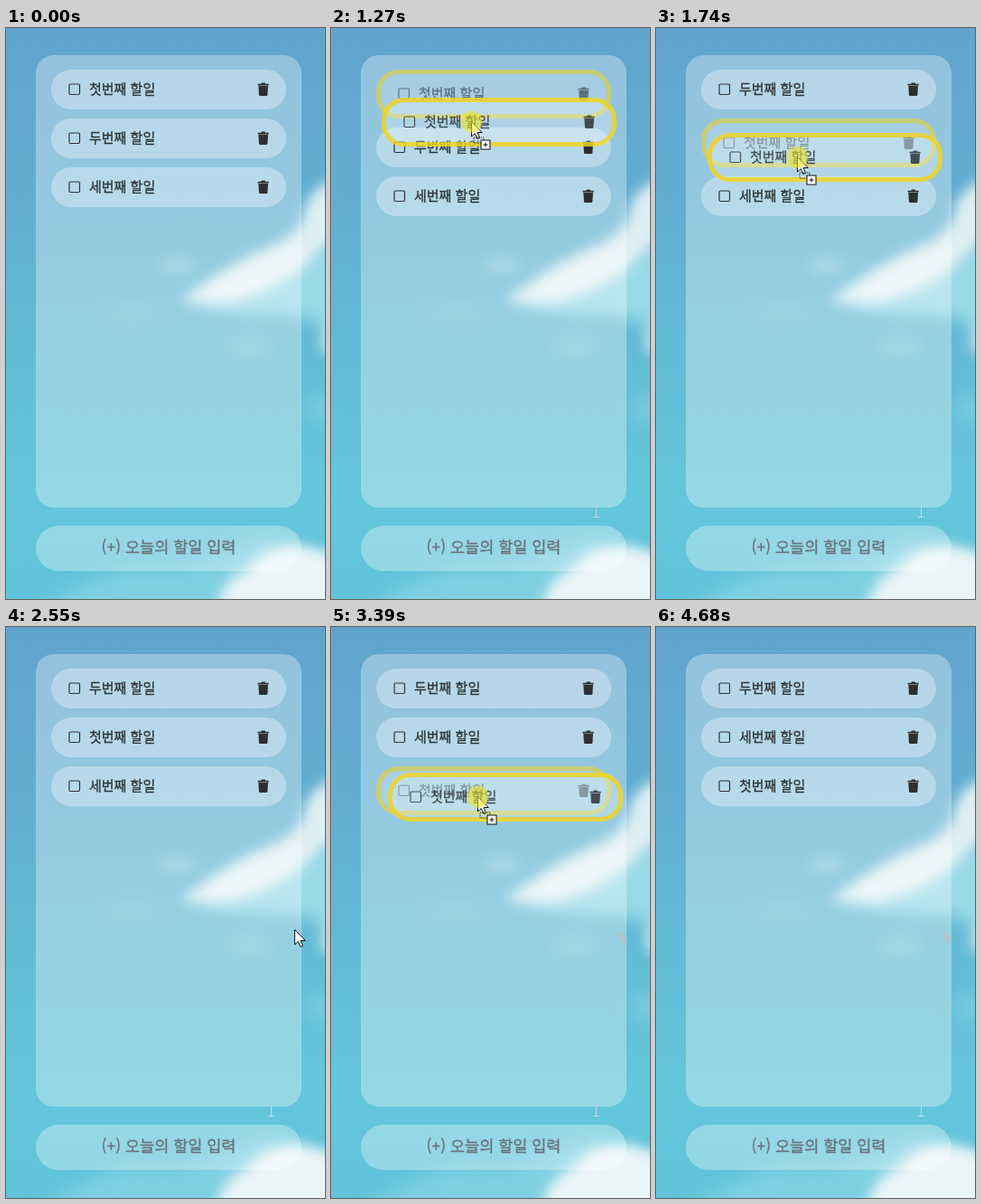
An HTML page for the animation above (5460 ms loop, 353x631 px).

```html
<!DOCTYPE html>
<html lang="ko">
<head>
<meta charset="utf-8">
<title>할일 목록</title>
<style>
  html, body { margin: 0; width: 100%; height: 100%; overflow: hidden; background: #62bcd6; }
  svg { display: block; width: 353px; height: 631px; }
  text { font-family: "Noto Sans CJK KR", "Noto Sans CJK", sans-serif; font-weight: 500; stroke-width: .3; }
</style>
</head>
<body>
<svg viewBox="0 0 353 631">
  <defs>
    <linearGradient id="sky" x2="0" y2="1">
      <stop offset="0" stop-color="#61a3cd"/>
      <stop offset=".3" stop-color="#62aed1"/>
      <stop offset=".6" stop-color="#63bdd6"/>
      <stop offset=".82" stop-color="#64c6db"/>
      <stop offset="1" stop-color="#60c3d9"/>
    </linearGradient>
    <filter id="soft" x="-50%" y="-50%" width="200%" height="200%"><feGaussianBlur stdDeviation="7"/></filter>
    <filter id="haze" x="-50%" y="-50%" width="200%" height="200%"><feGaussianBlur stdDeviation="10"/></filter>
    <g id="trash" fill="#2f2f2f">
      <path d="M4.2 1.2L5 0H8.5L9.3 1.2H12.7V3H.6V1.2Z"/>
      <path d="M1.3 3.6H12L11.4 13.2Q11.3 14.6 9.9 14.6H3.4Q2 14.6 1.9 13.2Z"/>
    </g>
    <path id="pointer" d="M0 0V16.5L3.8 13L6.4 19L9 17.9L6.5 12H11.7Z"/>
  </defs>

  <rect width="353" height="631" fill="url(#sky)"/>
  <g filter="url(#haze)" fill="#a4e1ec">
    <path d="M380 230L250 275L195 304L250 314L330 320L380 345Z" opacity=".85"/>
    <ellipse cx="140" cy="316" rx="38" ry="9" opacity=".28"/>
    <ellipse cx="270" cy="351" rx="26" ry="10" opacity=".4"/>
    <ellipse cx="352" cy="420" rx="20" ry="14" opacity=".4"/>
    <path d="M30 650Q110 585 190 600L290 560L353 590V650Z" opacity=".45"/>
  </g>
  <g filter="url(#soft)" fill="#f0f7f8">
    <path d="M380 160Q336 174 330 200Q328 224 300 238Q255 256 218 284L192 302L245 304Q295 292 330 264Q350 240 380 226Z" opacity=".88"/>
    <ellipse cx="189" cy="263" rx="20" ry="8" opacity=".28"/>
    <path d="M380 304Q342 330 348 358L380 366Z" opacity=".6"/>
    <path d="M232 660Q232 612 266 598Q286 572 320 572Q350 572 380 592V660Z" opacity=".95"/>
  </g>

  <g fill="#fff" fill-opacity=".32">
    <rect x="33" y="30" width="294" height="500" rx="20"/>
    <rect x="33" y="550" width="294" height="50" rx="25"/>
  </g>
  <text x="180" y="579.5" font-size="17.5" text-anchor="middle" fill="#687378" stroke="#687378">(+) 오늘의 할일 입력</text>

  <path id="barTrail" d="M293.5 529V541M290 540.5H297" fill="none" stroke="#d3e2e6" opacity=".8"/>
  <use id="pointerTrail" href="#pointer" x="317.5" y="333.5" fill="#b0c4cc" opacity=".85"/>
  <g id="list"></g>

  <g id="cursor">
    <path id="bar" d="M-3 -8.5H3M.5 -8.5V8.5M-3 8.5H3" fill="none" stroke="#e8eef0"/>
    <path id="move" d="M0 -12L5 -7H2V-2H7V-5L12 0L7 5V2H2V7H5L0 12L-5 7H-2V2H-7V5L-12 0L-7 -5V-2H-2V-7H-5Z" fill="#fff" stroke="#222"/>
    <use id="arrow" href="#pointer" fill="#fff" stroke="#111"/>
    <g id="copy" stroke="#111">
      <rect x="2.5" y="17.5" width="11" height="6" fill="none" stroke-dasharray="1 1"/>
      <rect x="10.5" y="20.5" width="10" height="10" fill="#fff"/>
      <path d="M13 25.5H18M15.5 23V28"/>
    </g>
    <circle id="press" r="12" fill="#f0e51e" opacity=".58"/>
  </g>
</svg>
<script>
const LOOP = 5460;
const STEP = 67;              // cursor positions are sampled at about 15 per second
const ROW = 54, TOP = 46, LEFT = 50, INSET = 5;
const GRAB = { x: 99, y: 26 };

const $ = id => document.getElementById(id);
const show = (el, on) => el.setAttribute('display', on ? 'inline' : 'none');
const place = (el, x, y) => el.setAttribute('transform', `translate(${x} ${y})`);
const within = (v, a, b) => v >= a && v < b;

// Each move glides from the previous resting point; bow bends the path sideways.
const home = { x: 380, y: 594 };
const moves = [
  { start: 200, end: 730, x: 149, y: 72, bow: -110 },
  { start: 1070, end: 1410, x: 157, y: 114 },
  { start: 1480, end: 1740, x: 156, y: 142 },
  { start: 2130, end: 2330, x: 345, y: 378 },
  { start: 2550, end: 3040, x: 148, y: 127, bow: 12 },
  { start: 3110, end: 3580, x: 163, y: 203, bow: -3, ease: 0.7 },
  { start: 3980, end: 4110, x: 288, y: 382 },
  { start: 4460, end: 4680, x: 317, y: 660 }
];

const drags = [
  { press: 870, lift: 1070, drop: 2070 },
  { press: 3110, lift: 3170, drop: 3910 }
];

function cursorAt(t) {
  const i = moves.findLastIndex(m => m.start <= t);
  if (i < 0) return home;
  const from = moves[i - 1] || home;
  const { start, end, x, y, bow = 0, ease = 0.3 } = moves[i];
  const last = Math.round((end - start) / STEP);
  const step = Math.min(last, Math.floor((t - start) / (end - start) * last + 0.15));
  const p = (step + 1) / (last + 1);
  const k = p * (1 + ease * (1 - p));
  const dx = x - from.x, dy = y - from.y;
  const bend = 4 * k * (1 - k) * bow / Math.hypot(dx, dy);
  return {
    x: Math.round(from.x + dx * k - dy * bend),
    y: Math.round(from.y + dy * k + dx * bend)
  };
}

function makeItem(label) {
  const g = document.createElementNS('http://www.w3.org/2000/svg', 'g');
  g.innerHTML = `<rect class="fill" width="260" height="44" rx="25" fill="#fff" fill-opacity=".32"/>
    <rect class="edge" x="2.5" y="2.5" width="255" height="49" rx="22.5" fill="none" stroke="#f3d51c" stroke-width="5"/>
    <g class="body">
      <rect x="20" y="16" width="11.5" height="11.5" rx="1.2" fill="none" stroke="#333" stroke-width="1.2"/>
      <text x="42" y="27" font-size="15" fill="#2e3436" stroke="#2e3436">${label}</text>
      <use class="bin" href="#trash" x="228" y="14.5"/>
    </g>`;
  $('list').append(g);
  return g;
}

function drawItem(g, x, y, held, opacity) {
  const inset = held ? INSET : 0;
  const height = 44 + 2 * inset;
  const fill = g.querySelector('.fill');
  place(g, x, y);
  g.setAttribute('opacity', opacity);
  fill.setAttribute('height', height);
  fill.setAttribute('ry', Math.min(25, height / 2));
  fill.setAttribute('rx', Math.min(25, height / 2));
  show(g.querySelector('.edge'), held);
  place(g.querySelector('.body'), inset, inset);
  g.querySelector('.bin').setAttribute('x', 228 - 2 * inset);
}

const items = ['첫번째 할일', '두번째 할일', '세번째 할일'].map(makeItem);
const ghost = makeItem('첫번째 할일');

function render(t) {
  const { x, y } = cursorAt(t);
  const pressed = drags.some(d => within(t, d.press, d.drop));
  const dragging = drags.some(d => within(t, d.lift, d.drop));

  // The held item trades places once the pointer passes the middle of the next row.
  let slot = drags.filter(d => t >= d.drop).length;
  if (dragging && y > TOP + ROW * (slot + 1) + 32) slot++;
  const order = [1, 2];
  order.splice(slot, 0, 0);
  let top = TOP;
  for (const id of order) {
    const held = dragging && id === 0;
    drawItem(items[id], LEFT, top, held, held ? 0.55 : 1);
    top += ROW + (held ? 2 * INSET : 0);
  }
  show(ghost, dragging);
  if (dragging) drawItem(ghost, x - GRAB.x, y - GRAB.y, true, 0.82);

  const overItem = within(x, 50, 310) && within(y, TOP, 198) && (y - TOP) % ROW < 44;
  const overInput = within(y, 520, 600);
  const moving = overItem && !dragging;
  show($('cursor'), within(t, moves[0].start, moves.at(-1).end));
  place($('cursor'), x + 0.5, y + 0.5);
  show($('bar'), overInput);
  show($('move'), moving);
  show($('arrow'), !overInput && !moving);
  show($('copy'), dragging);
  show($('press'), pressed);
  show($('barTrail'), t >= moves[0].start + STEP);
  show($('pointerTrail'), t >= moves[4].start + STEP);
}

const began = performance.now();
function tick() {
  render((performance.now() - began) % LOOP);
  requestAnimationFrame(tick);
}
tick();
</script>
</body>
</html>
```
